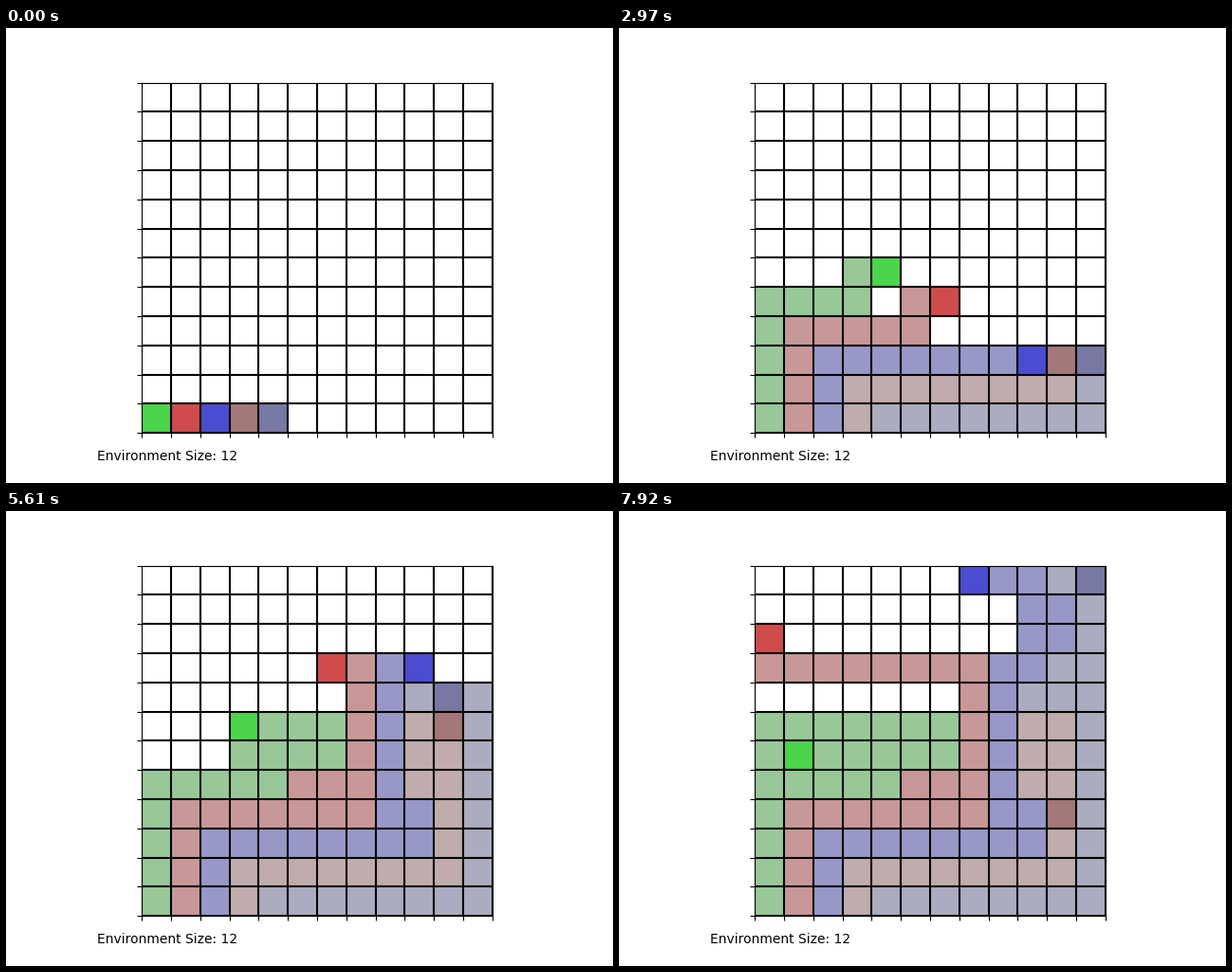
Write a matplotlib script that moves like this. It is 640 by 480 pixels and loops after 8000 ms.

```python
import matplotlib.pyplot as plt
import numpy as np
from matplotlib.animation import FuncAnimation
from matplotlib.colors import to_rgb

SIZE = 12
LOOP = 8000      # ms
TICK = 20        # ms per drawn frame
MOVE = 330       # ms per move of the robots

DIRS = {"U": (0, 1), "D": (0, -1), "L": (-1, 0), "R": (1, 0)}

# (head colour, trail colour, moves); robot i starts in column i of the bottom row
ROBOTS = [
    ("#4cd44c", "#98c898", "UUUURRRURDURRULLLLLLDRRL"),
    ("#d04c4c", "#c89898", "UUURRRRURDRUUUUULLLLLLLU"),
    ("#4c4cd0", "#9898c8", "UURRRRRRRULUUUUURURULULL"),
    ("#a47878", "#c0acac", "URRRRRRRUUUULDUURDLDURDD"),
    ("#7878a4", "#acacc0", "RRRRRRRUUUUUUULLRURUUULR"),
]


def walk(start, moves):
    """All cells visited from start, in order."""
    steps = [start] + [DIRS[m] for m in moves]
    return np.cumsum(steps, axis=0)


PATHS = [walk((i, 0), moves) for i, (_, _, moves) in enumerate(ROBOTS)]


def board(step):
    """RGB grid after the given number of moves."""
    cells = np.ones((SIZE, SIZE, 3))
    for (_, trail, _), path in zip(ROBOTS, PATHS):
        for x, y in path[:step]:
            cells[y, x] = to_rgb(trail)
    for (head, _, _), path in zip(ROBOTS, PATHS):
        x, y = path[step]
        cells[y, x] = to_rgb(head)
    return cells


fig, ax = plt.subplots(figsize=(6.4, 4.8), dpi=100)
image = ax.imshow(board(0), origin="lower", interpolation="nearest")

edges = np.arange(SIZE + 1) - 0.5
ax.set_xticks(edges)
ax.set_yticks(edges)
ax.tick_params(labelbottom=False, labelleft=False)
ax.grid(color="black", linewidth=1.5)
fig.text(0.15, 0.05, f"Environment Size: {SIZE}", fontsize=10,
         family="DejaVu Sans")


def update(frame):
    step = (frame * TICK + TICK // 2) // MOVE
    image.set_data(board(step))
    return [image]


anim = FuncAnimation(fig, update, frames=LOOP // TICK, interval=TICK,
                     repeat=True, repeat_delay=0)
plt.show()
```
